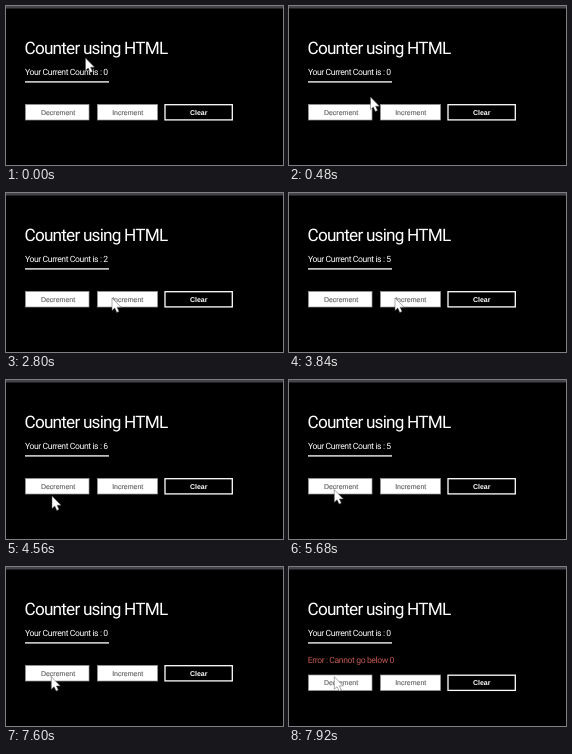
Recreate the animation shown at these times as an HTML page. Size 277x159 px, loop 8000 ms.

```html
<!DOCTYPE html>
<html lang="en">
<head>
<meta charset="utf-8">
<title>Counter</title>
<style>
  html, body { margin: 0; height: 100%; overflow: hidden; background: #000; }
  svg { display: block; width: 100%; height: 100%; }
  text { fill: #fff; font: 400 8.6px Roboto, sans-serif; letter-spacing: -.39px; text-rendering: geometricPrecision; }
  .title { font-size: 17.2px; letter-spacing: -.8px; }
  .error { fill: #c05a50; }
  .button text { font: 7px "Liberation Sans", Arial, sans-serif; letter-spacing: 0; fill: #666; stroke: #666; stroke-width: .15; text-anchor: middle; }
  .button rect { fill: #fff; stroke: #999; stroke-width: .7; }
  .button.clear rect { fill: #000; stroke: #fff; stroke-width: 1.3; }
  .button.clear text { fill: #fff; stroke: none; font-weight: bold; }
</style>
</head>
<body>
<svg viewBox="0 0 277 159">
  <rect width="277" height="159"/>
  <rect width="277" height="2.5" fill="#42444a"/>
  <text class="title" x="18.5" y="47.6">Counter using HTML</text>
  <text x="19" y="69.2">Your Current Count is : <tspan id="count">0</tspan></text>
  <rect x="19" y="75.2" width="84" height="1.4" fill="#eee"/>
  <text class="error" id="error" x="18.7" y="96.2">Error : Cannot go below 0</text>
  <g id="buttons">
    <g class="button"><rect x="19.5" y="98.5" width="63.5" height="15.5"/><text x="52" y="108.7">Decrement</text></g>
    <g class="button"><rect x="91.5" y="98.5" width="60" height="15.5"/><text x="121.7" y="108.7">Increment</text></g>
    <g class="button clear"><rect x="159" y="98.7" width="67.3" height="15.2"/><text x="192.7" y="108.7">Clear</text></g>
  </g>
  <path id="cursor" d="M0 0V12.5L2.8 10 4.8 14.4 7 13.4 5.1 9.2H9Z" fill="#fff" stroke="#555" stroke-width=".5"/>
</svg>
<script>
  const LOOP = 8000, ERROR_AT = 7760;
  const byId = id => document.getElementById(id);
  const count = byId('count'), error = byId('error'), buttons = byId('buttons'), cursor = byId('cursor');

  const increments = [2080, 2480, 2880, 3280, 3640, 4000];
  const decrements = [5600, 5960, 6280, 6600, 7000, 7360];

  // Pointer path: time, x, y
  const path = [
    [0, 79.5, 52], [80, 79.5, 54], [480, 81.5, 91], [780, 189, 103], [880, 180, 104],
    [1320, 106, 105], [4200, 106, 105], [4520, 46, 116], [5120, 46, 116],
    [5400, 45.3, 109.7], [LOOP, 45.3, 109.7]
  ];

  function pointerAt(t) {
    const i = path.findIndex(p => p[0] > t);
    const [t0, x0, y0] = path[i - 1], [t1, x1, y1] = path[i];
    const u = (t - t0) / (t1 - t0), k = u * u * (3 - 2 * u);
    return [x0 + (x1 - x0) * k, y0 + (y1 - y0) * k];
  }

  const clicksBy = (times, t) => times.filter(click => click <= t).length;

  function draw(now) {
    const t = Math.floor(now % LOOP / 80) * 80;
    const failed = t >= ERROR_AT;
    count.textContent = clicksBy(increments, t) - clicksBy(decrements, t);
    error.setAttribute('visibility', failed ? 'visible' : 'hidden');
    buttons.setAttribute('transform', `translate(0 ${failed ? 9.5 : 0})`);
    cursor.setAttribute('transform', `translate(${pointerAt(t)})`);
    requestAnimationFrame(draw);
  }
  draw(performance.now());
</script>
</body>
</html>
```
